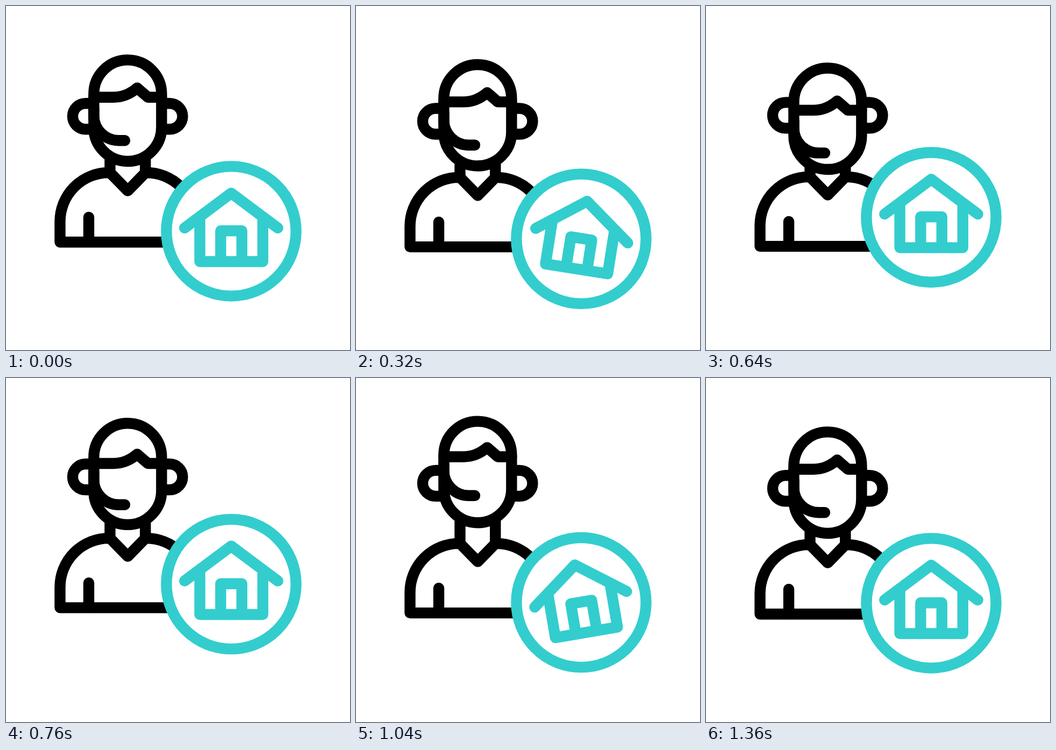
An HTML page for the animation above (1.68 s loop, 640 by 640 pixels).

```html
<!DOCTYPE html>
<html lang="en">
<head>
<meta charset="utf-8">
<title>Housing support agent</title>
<style>
  html, body { margin: 0; width: 100%; height: 100%; overflow: hidden; background: #fff; }
  svg { display: block; width: 100vw; height: 100vh; }
  .line { fill: none; stroke: #000; stroke-width: 20.4; stroke-linecap: round; stroke-linejoin: round; }
  .teal { stroke: #33cdce; }
  .solid { fill: #fff; }
</style>
</head>
<body>
<svg viewBox="0 0 640 640">
  <g id="body" class="line">
    <path d="M352 439.3H100.5V401A91 91 0 0 1 191.5 310H193.5L226.5 343.8L259.5 310H261.5A91 91 0 0 1 352 401Z"/>
    <path d="M193.5 310V258M259.3 310V258M154 393V439"/>
  </g>
  <g id="ears" class="line">
    <path d="M163 181.2H148A24 24 0 0 0 148 229.2H163M290 181.2H304.5A24 24 0 0 1 304.5 229.2H290"/>
  </g>
  <g id="head" class="line solid">
    <rect x="163.4" y="100.4" width="126" height="188.6" rx="63"/>
  </g>
  <g id="hair" class="line">
    <path d="M163.4 169.7H200Q224 169.7 244 152.5L264 169.7H289.4"/>
  </g>
  <g id="mic" class="line">
    <path d="M163.4 190V204A46.5 46.2 0 0 0 210 250.2H221"/>
  </g>
  <g id="badge" class="line teal">
    <circle class="solid" cx="419" cy="419" r="120.6"/>
    <g id="house">
      <path d="M332.3 413L419 348.2L505.7 413"/>
      <path d="M360.6 396V475.5H477.8V396M399.4 475.5V418.2H438.8V475.5"/>
    </g>
  </g>
</svg>
<script>
  const LOOP = 1680, STEP = 40, START = 80, END = 1360;

  // Each track lists [time in ms, value]; values ease in and out between keys.
  const bob = (start, low, down, high, up, end) =>
    [[start, 0], [low, down], [high, up], [end, 0]];

  const shifts = {
    body:  bob(180, 500, 22,   840, -17,   1100),
    ears:  bob(180, 460, 18.5, 840, -25.8, 1180),
    head:  bob(185, 540, 27,   875, -31.5, 1270),
    hair:  bob(190, 565, 32.5, 890, -33.5, 1290),
    mic:   bob(190, 565, 32,   900, -42,   1320),
    badge: bob(70,  410, 17,   733, -36,   1085)
  };
  const tilt = [[160, 0], [320, 9], [480, -9], [640, 0],
                [880, 0], [1040, -9.7], [1200, 9.7], [1360, 0]];

  const $ = id => document.getElementById(id);

  function valueAt(keys, t) {
    const i = keys.findIndex(k => k[0] > t);
    if (i < 1) return 0;
    const [t0, a] = keys[i - 1], [t1, b] = keys[i];
    const p = (t - t0) / (t1 - t0);
    return a + (b - a) * (1 - Math.cos(Math.PI * p)) / 2;
  }

  function draw(now) {
    const ms = now % LOOP;
    const t = ms < START ? 0 : Math.min(END, Math.floor(ms / STEP) * STEP);
    for (const id in shifts)
      $(id).setAttribute('transform', `translate(0 ${valueAt(shifts[id], t).toFixed(2)})`);
    $('house').setAttribute('transform', `rotate(${valueAt(tilt, t).toFixed(2)} 419 419)`);
  }

  let origin;
  function tick(now) {
    origin ??= now;
    draw(now - origin);
    requestAnimationFrame(tick);
  }
  draw(0);
  requestAnimationFrame(tick);
</script>
</body>
</html>
```
